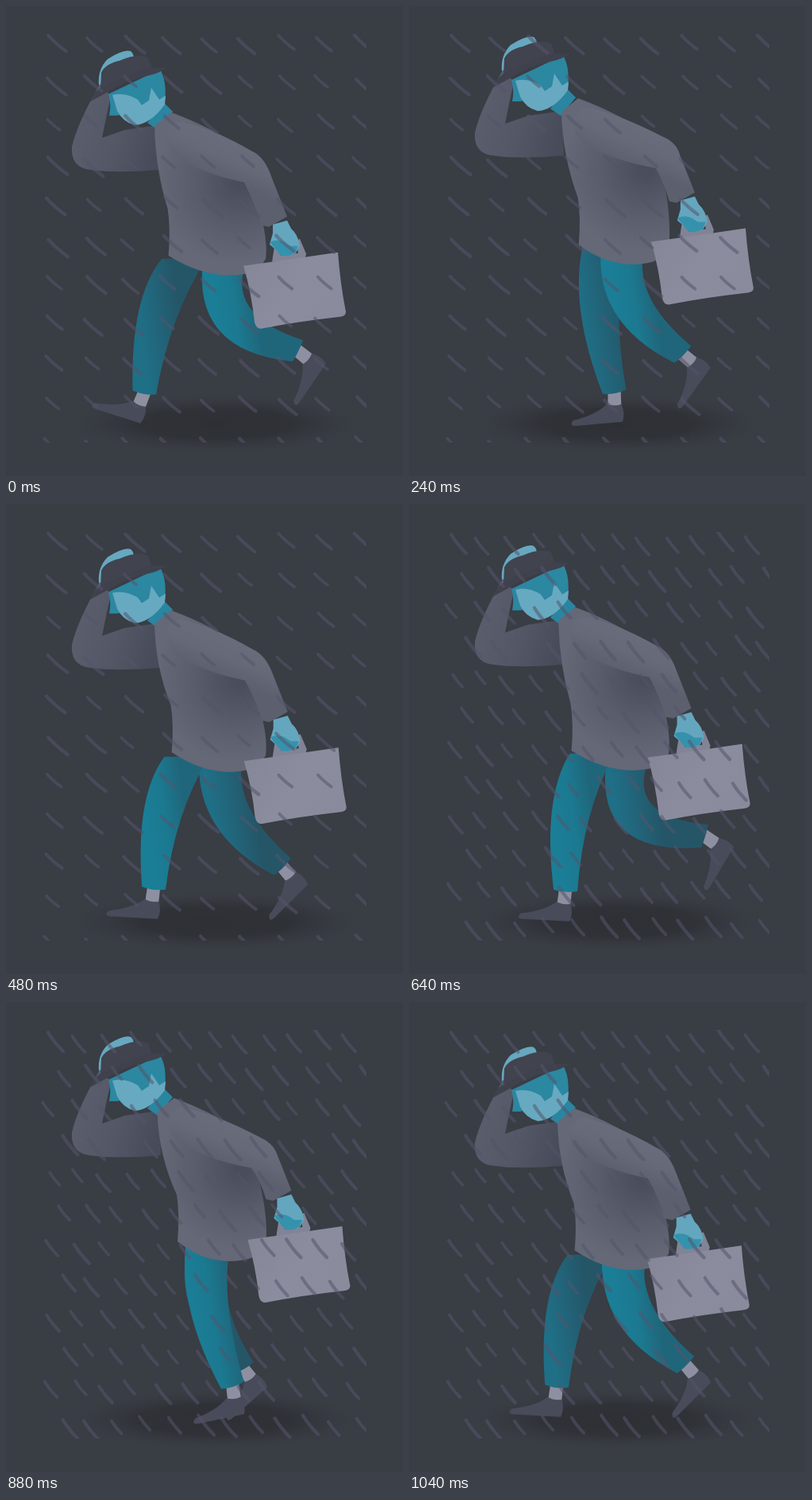
Animation, 500 px wide and 591 px high, one loop 1120 ms. Source, as an HTML page with a canvas:

```html
<!DOCTYPE html>
<html lang="en">
<head>
<meta charset="utf-8">
<title>Walking in the rain</title>
<style>
html, body { margin: 0; width: 100%; height: 100%; overflow: hidden; background: #393d44; }
canvas { display: block; }
</style>
</head>
<body>
<canvas id="stage" width="500" height="591"></canvas>
<script>
const ctx = document.getElementById('stage').getContext('2d');
const { cos, sin, exp, max, hypot, floor, PI } = Math;
const STEP_MS = 80, STRIDE = 7, CYCLE = 2 * STRIDE;

// 0 to 1 and back once per stride, highest at the given pose.
const rise = (pose, peak) => (1 + cos(2 * PI * (pose - peak) / STRIDE)) / 2;
const shift = ([dx, dy]) => (x, y) => [x + dx, y + dy];

function fill(path, color) {
  ctx.fillStyle = color;
  ctx.fill(new Path2D(path));
}

function moved([dx, dy], draw) {
  ctx.save();
  ctx.translate(dx, dy);
  draw();
  ctx.restore();
}

function blend(type, coords, ...colors) {
  const g = ctx[type](...coords);
  colors.forEach((c, i) => g.addColorStop(i / (colors.length - 1), c));
  return g;
}

function foot(x, y, angle) {
  ctx.save();
  ctx.translate(x, y);
  ctx.rotate(angle * PI / 180);
  fill('M-8,-4 L8,-4 L8,19 L-9,18 Z', '#8e90a2');
  fill('M-10,15 Q0,19 8,16 Q13,27 9,38 L-50,41 Q-60,41 -53,34 Q-24,28 -10,15', '#484b59');
  ctx.restore();
}

// The ankle runs round a closed path; hip, knee and foot follow from it.
function leg(k, dy, colors) {
  const turn = 2 * PI * k / CYCLE;
  const lift = 70 * exp(-(((k - 8.4) / 2.6) ** 2));
  const ax = 284.5 - 95 * cos(turn - 0.22) + 17.7 * cos(2 * turn - 2.45) + 7 * cos(3 * turn - 2.16);
  const ay = 486 - lift;
  const hx = 254 + 0.27 * (ax - 284), hy = 318 + dy;

  const reach = hypot(ax - hx, ay - hy);
  const nx = (ay - hy) / reach, ny = (hx - ax) / reach;
  const bend = 12 + 1.25 * max(0, 168 - reach);
  const kx = hx + 0.45 * (ax - hx) - nx * bend;
  const ky = hy + 0.45 * (ay - hy) - ny * bend;

  const heelStrike = 0.65 * max(0, 206 - ax);
  foot(ax, ay, heelStrike - 60 * (1 - exp(-lift / 25)));

  const shin = hypot(ax - kx, ay - ky);
  const cx = (ay - ky) / shin, cy = (kx - ax) / shin;
  const edge = side => {
    const hip = [hx + side * 28, hy];
    const knee = [kx + side * nx * 24, ky + side * ny * 24];
    const cuff = [ax + side * cx * 15, ay + side * cy * 15];
    const bow = knee.map((v, i) => 2 * v - (hip[i] + cuff[i]) / 2);
    return { hip, bow, cuff };
  };
  const a = edge(-1), b = edge(1);
  fill(`M${a.hip} Q${a.bow} ${a.cuff} Q${ax},${ay + 4} ${b.cuff} Q${b.bow} ${b.hip} Z`,
    blend('createLinearGradient', [kx - 24, ky, kx + 28, ky - 8], ...colors));
}

function farArm() {
  fill('M119,97 Q90,147 83,177 Q81,203 105,206 Q138,211 195,206 L193,150 L150,156 L121,166 Q126,140 132,114 Z',
    blend('createLinearGradient', [90, 150, 190, 180], '#5a5d6c', '#545766', '#484b59'));
}

function torso(body, hem) {
  const b = shift(body), h = shift(hem), low = shift([0, hem[1]]);
  fill(`M${b(187, 151)} L${b(208, 134)} Q${b(262, 154)} ${b(305, 184)} L${b(320, 260)}
    Q${low(330, 295)} ${low(327, 318)} Q${low(318, 334)} ${low(300, 337)}
    Q${low(255, 345)} ${h(204, 314)} Q${h(207, 280)} ${h(203, 255)} Q${b(188, 205)} ${b(187, 151)}`,
    blend('createRadialGradient', [...b(295, 222), 8, ...b(287, 225), 100], '#4a4d5c', '#595c6b', '#656877'));
}

function neckAndHand() {
  fill('M178,147 L199,122 L210,133 L191,156 Z', '#2a85a0');
  fill('M117,100 Q115,80 128,67 Q148,54 157,57 Q167,66 150,76 Z', '#66a8bf');
}

function head() {
  fill('M129,111 L194,80 Q203,95 200,122 L180,128 L140,138 L130,138 Q133,125 129,111', '#2c87a1');
  fill('M134,112 Q150,108 166,118 L171,125 L180,119 L183,103 L193,118 L201,113 L200,124 Q182,149 162,150 Q147,146 140,132 Z', '#67a9c0');
  fill('M119,106 L120,84 Q125,73 143,69 Q166,59 179,65 L185,82 Z', '#41434f');
  fill('M105,121 Q112,104 128,99 L180,77 Q194,79 204,77 Q193,85 178,88 Q150,94 129,108 Z', '#3f414d');
}

function nearArm(body, grip) {
  const b = shift(body), c = shift(grip), e = shift([body[0] + grip[0], body[1]]);
  fill(`M${b(202, 165)} Q${b(204, 146)} ${b(222, 146)} Q${b(262, 155)} ${e(308, 183)}
    Q${e(324, 190)} ${c(333, 217)} L${c(352, 265)} L${c(329, 278)} L${c(320, 276)}
    Q${c(312, 250)} ${e(298, 222)} Q${b(250, 212)} ${b(215, 190)} Q${b(202, 180)} ${b(202, 165)}`,
    blend('createLinearGradient', [...b(270, 160), ...b(250, 210)], '#696c7b', '#666978', '#5c5f6e'));
}

function caseInHand() {
  fill('M333,322 L337,296 L343,296 L344,314 L366,311 L363,296 L368,293 L376,312 L374,320 Z', '#818496');
  fill('M297,327 Q355,319 416,310 Q419,350 426,385 Q426,390 419,391 Q365,397 319,406 Q313,406 311,398 Q307,360 297,327',
    blend('createLinearGradient', [300, 320, 420, 400], '#858799', '#8b8d9f', '#898b9d'));
  fill('M334,275 L352,270 L357,280 Q366,288 368,302 L362,312 L346,314 L330,300 L334,286 Z', '#64a6be');
  fill('M330,297 Q340,293 348,297 L356,302 L366,302 L362,311 Q350,317 343,313 Z', '#3592ad');
}

function shadow() {
  ctx.save();
  ctx.translate(264, 525);
  ctx.scale(1, 0.2);
  ctx.fillStyle = blend('createRadialGradient', [0, 0, 0, 0, 0, 195],
    'rgba(42,44,48,.8)', 'rgba(42,44,48,.65)', 'rgba(57,61,68,0)');
  ctx.fillRect(-200, -200, 400, 400);
  ctx.restore();
}

function seeded(seed) {
  return () => {
    const v = sin(seed++) * 43758.5453;
    return v - floor(v);
  };
}

// Slanted streaks on a loose grid; every other row is set in by the stagger.
function rain({ seed, gapX, gapY, stagger, jitter, dx, dy }) {
  const random = seeded(seed);
  const loose = () => (random() - 0.5) * jitter;
  ctx.save();
  ctx.beginPath();
  ctx.rect(44, 35, 410, 514);
  ctx.clip();
  ctx.strokeStyle = 'rgba(86,84,108,.55)';
  ctx.lineCap = 'round';
  for (let row = 0; row * gapY < 514; row++) {
    for (let left = 49 + row % 2 * stagger; left < 454; left += gapX) {
      const x = left + loose(), y = 37 + row * gapY + loose();
      const size = 0.6 + 0.4 * random();
      ctx.lineWidth = 2.5 + 2 * size;
      ctx.beginPath();
      ctx.moveTo(x + 2, y + 2);
      ctx.quadraticCurveTo(x + dx * size * 0.45, y + dy * size * 0.55, x + dx * size, y + dy * size);
      ctx.stroke();
    }
  }
  ctx.restore();
}

const drizzle = { seed: 5, gapX: 48.6, gapY: 50.5, stagger: 0, jitter: 6, dx: 27, dy: 24 };
const downpour = { seed: 9, gapX: 34, gapY: 44, stagger: 17, jitter: 10, dx: 22, dy: 27 };

function draw(step) {
  const pose = step % STRIDE;
  const bob = rise(pose, 3) ** 1.5, sway = rise(pose, 3.3);
  const body = [5 * bob, -18 * bob], upper = [0, body[1]];
  const hem = [12 * rise(pose, 4), -14 * sway];
  const grip = [2 + 6 * sway, -31 * sway];

  ctx.fillStyle = '#393d44';
  ctx.fillRect(0, 0, 500, 591);
  shadow();
  leg(step, body[1], ['#1f6f86', '#226378', '#245668']);
  leg((step + STRIDE) % CYCLE, body[1], ['#1b7e97', '#1b7990', '#20667b']);
  moved(upper, () => { farArm(); neckAndHand(); });
  torso(body, hem);
  moved(upper, head);
  nearArm(body, grip);
  moved(grip, caseInHand);
  rain(step % 3 ? downpour : drizzle);
}

const start = performance.now();
function tick() {
  draw(floor((performance.now() - start) / STEP_MS) % CYCLE);
  requestAnimationFrame(tick);
}
tick();
</script>
</body>
</html>
```
